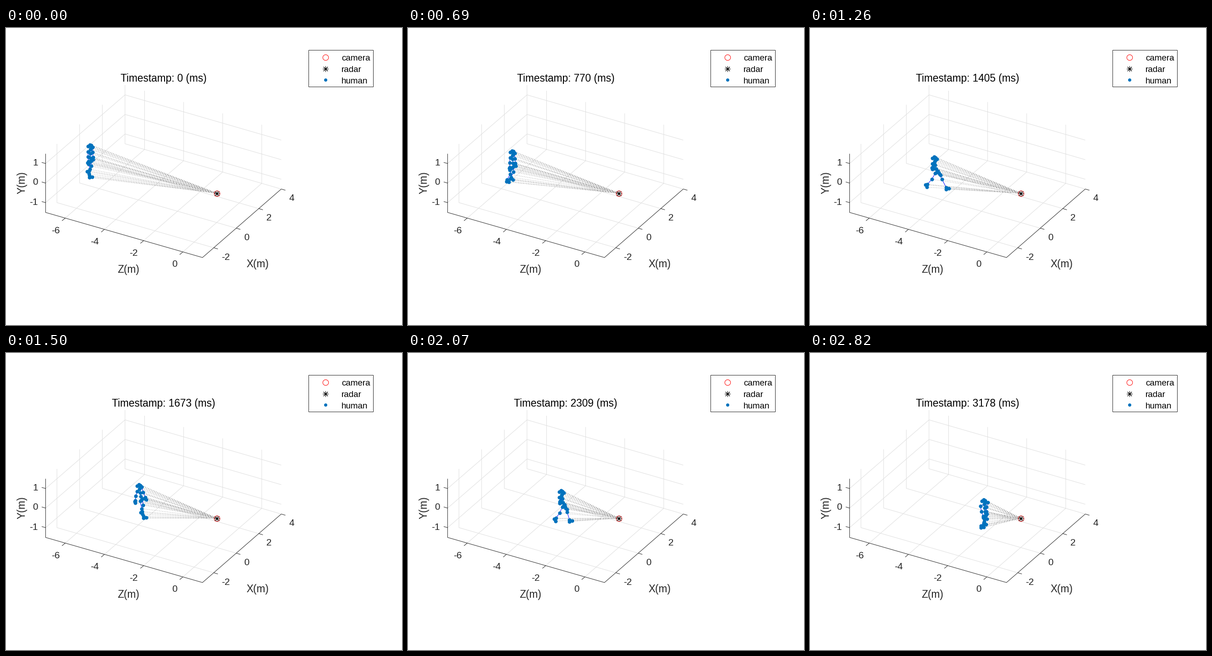
A matplotlib script that plays this animation: 864 by 648 pixels, repeating every 2850 ms.

```python
import numpy as np
import matplotlib.pyplot as plt
from matplotlib.animation import FuncAnimation

W, H, FRAMES = 864, 648, 95
PX = 0.72  # points per pixel at 100 dpi
INK, GRID, BLUE = "#262626", "#dfdfdf", "#0072BD"
RADAR = np.array([460, 360.5])

plt.rcParams["font.family"] = ["Liberation Sans", "DejaVu Sans"]
fig = plt.figure(figsize=(W / 100, H / 100), dpi=100, facecolor="white")
ax = fig.add_axes([0, 0, 1, 1])
ax.set_xlim(0, W)
ax.set_ylim(H, 0)
ax.axis("off")


# ---------- scene ----------
LEFT, FRONT = np.array([86.4, 402.4]), np.array([428.7, 500.8])
BACK, RIGHT = np.array([259.7, 252.6]), np.array([600.6, 351.3])


def project(x, y, z):
    """World metres to pixels; x in -3..4, y in -1.5..1.5, z in -7..1."""
    u, v = (x + 3) / 7, (z + 7) / 8
    near = LEFT + (FRONT - LEFT) * v
    far = BACK + (RIGHT - BACK) * v
    return near + (far - near) * u - [0, (y + 1.5) * 42.67]


def line(points, color, z=1):
    ax.plot(*np.array(points).T, color=color, lw=PX, zorder=z,
            solid_capstyle="butt")


def label(x, y, s, size, ha="center", color=INK, **kw):
    return ax.text(x, y, s, size=size * PX, ha=ha, va="baseline",
                   color=color, zorder=8, **kw)


def tick(p, d):
    line([p, p + np.array(d)], INK, 2)


for x in (-2, 0, 2, 4):
    line([project(x, 1.5, -7), project(x, -1.5, -7), project(x, -1.5, 1)], GRID)
for z in (-6, -4, -2, 0):
    line([project(4, 1.5, z), project(4, -1.5, z), project(-3, -1.5, z)], GRID)
for y in (-1, 0, 1):
    line([project(-3, y, -7), project(4, y, -7), project(4, y, 1)], GRID)

line([LEFT - [0, 128], LEFT, FRONT, RIGHT], INK, 2)
for i in range(4):
    x, z = 2 * i - 2, 2 * i - 6
    tick(project(x, -1.5, 1), (9, 2.7))
    tick(project(-3, -1.5, z), (-7, 6))
    label(470 + 49.2 * i, 505.5 - 42.7 * i, str(x), 20.8, "left")
    label(117 + 85.5 * i, 447.5 + 24.6 * i, str(z), 20.8, "right")
for y in (-1, 0, 1):
    tick(project(-3, y, -7), (-8.5, -2.5))
    label(70, 342.5 - 43 * y, str(y), 20.8, "right")

label(267, 534, "Z(m)", 22.6)
label(548.5, 522, "X(m)", 22.6)
label(41, 338, "Y(m)", 22.6, rotation=90, rotation_mode="anchor")
title = label(344, 116.5, "", 22.6, color="black")


def camera(x, y):
    ax.plot(x, y, "o", ms=12.5 * PX, mfc="none", mec="red", mew=PX, zorder=7)


def radar(x, y):
    ax.plot(x, y, marker=(8, 2, 0), ms=13 * PX, mec="black", mew=PX, zorder=7)


ax.add_patch(plt.Rectangle((659.5, 47.5), 141, 80, fc="white", ec=INK,
                           lw=PX, zorder=6))
camera(697, 63.5)
radar(697, 88.5)
ax.plot(697, 113, "o", ms=7 * PX, mfc=BLUE, mec="none", zorder=7)
for i, name in enumerate(("camera", "radar", "human")):
    label(732, 71 + 25 * i, name, 18.8, "left", "black")
camera(*RADAR)
radar(*RADAR)

rays, = ax.plot([], [], color="#848484", lw=PX, ls=(0, (1, 2.6)), zorder=3)
bones, = ax.plot([], [], color="blue", lw=PX, zorder=4)
joints, = ax.plot([], [], "o", ms=8 * PX, mfc=BLUE, mec="none", zorder=5)


# ---------- walking figure ----------
STEP, SWING = 12.7, 11  # frames between footfalls, frames a foot is in the air
FIRST = 3.5             # first footfall
STOP = 84               # the walk slows down and turns from here


def smooth(u):
    u = np.clip(u, 0, 1)
    return u * u * (3 - 2 * u)


def travel(t):
    """Horizontal pixels walked: speeds up gently, then slows."""
    return t * (1.497 + 0.0207 * t - 0.000154 * t * t)


def footfall(t, side):
    """Where a foot lands; the lead over the body grows and fades."""
    x = 178 + travel(t) + 30 * np.sin(np.pi * t / 97)
    return np.array([x, 354.9 + 0.29 * (x - 295)]) + side * np.array([2.7, -3.1])


def foot(t, side):
    """Ankle, heel and toe; side is 1 for left, -1 for right."""
    lands = [FIRST + STEP * k for k in range(8) if (-1) ** k == -side]
    if side < 0:
        lands.append(92)  # closing step
    pos, roll = footfall(0, side), 0
    for land in lands:
        place, start = footfall(land, side), land - SWING
        stride = place - pos
        u = (t - start) / SWING
        up = smooth((t - start + 10) / 6) * (1 - smooth((u - 0.25) / 0.35))
        roll = max(roll, up * min(1, stride[0] / 45))
        pos = pos + stride * smooth(u)
        if u < 1:
            break
    c, s = np.cos(1.3 * roll), np.sin(1.3 * roll)
    turn = np.array([(c, -s), (s, c)])
    ankle = pos - [0, 4 + 2.5 * roll]
    return ankle, ankle + turn @ [0, 4], ankle + turn @ [5.7, 2.6]


def limb(angle, length):
    """Limb hanging down and swung along the walking direction."""
    s, c = np.sin(angle), np.cos(angle)
    return length * np.array([s, 0.29 * s + c])


def arm(shoulder, a):
    b = a + 0.05 + 0.45 * abs(a)
    elbow = shoulder + limb(a, 11.3)
    wrist = elbow + limb(b, 10.3)
    return [shoulder, elbow, wrist, wrist + limb(b, 5.5)], wrist + limb(b - 0.4, 3)


def leg(hip, side, t):
    ankle, heel, toe = foot(t, side)
    d = ankle - hip
    n = np.hypot(*d)
    bend = 0.3 * max(0, 33 - n)
    knee = (hip + ankle) / 2 + bend * np.array([d[1], -d[0]]) / n
    return [hip, knee, ankle, heel], [ankle, toe]


def figure(t):
    """Chains of joints plus loose points."""
    end = smooth((t - STOP) / 10)
    dx = travel(t)
    neck = np.array([184 + dx, 264.8 + 0.3 * dx + 6.5 * end])
    hips = neck + [4, 23.5] + (1 - smooth(t / 45)) * np.array([-5, 4])
    phase = np.pi * (t - FIRST - 3 * STEP) / STEP
    swing = 0.58 * np.cos(phase) * smooth(t / 30) * (1 - 0.6 * end)

    side = np.array([5 + 3 * end, -4.7 + 0.7 * end])
    hip = np.array([2.7, -2.6])
    spine = [neck + (hips - neck) * f for f in (0, 0.33, 0.67, 1)]
    head = [neck + d for d in ((1, -2), (-1, -10.3), (-5, -7), (2, -8.5))]
    l_arm, l_thumb = arm(neck + side, -swing)
    r_arm, r_thumb = arm(neck - side, swing)
    chains = [head[:2], spine, [neck + side, neck, neck - side],
              [hips + hip, hips, hips - hip], l_arm, r_arm,
              *leg(hips + hip, 1, t), *leg(hips - hip, -1, t)]
    return chains, head + [l_thumb, r_thumb]


def draw(i):
    sample = i + (i >= 90)  # one sample is dropped near the end
    title.set_text(f"Timestamp: {round(sample * 33.457)} (ms)")
    chains, loose = figure(i)
    gap = np.full(2, np.nan)
    bones.set_data(*np.array([p for c in chains for p in [*c, gap]]).T)
    pts = np.unique(np.round([p for c in chains for p in c] + loose, 3), axis=0)
    joints.set_data(*pts.T)
    rays.set_data(*np.array([q for p in pts for q in (RADAR, p, gap)]).T)
    return title, bones, joints, rays


anim = FuncAnimation(fig, draw, frames=FRAMES, interval=30, repeat=True,
                     repeat_delay=0, blit=False)
plt.show()
```
